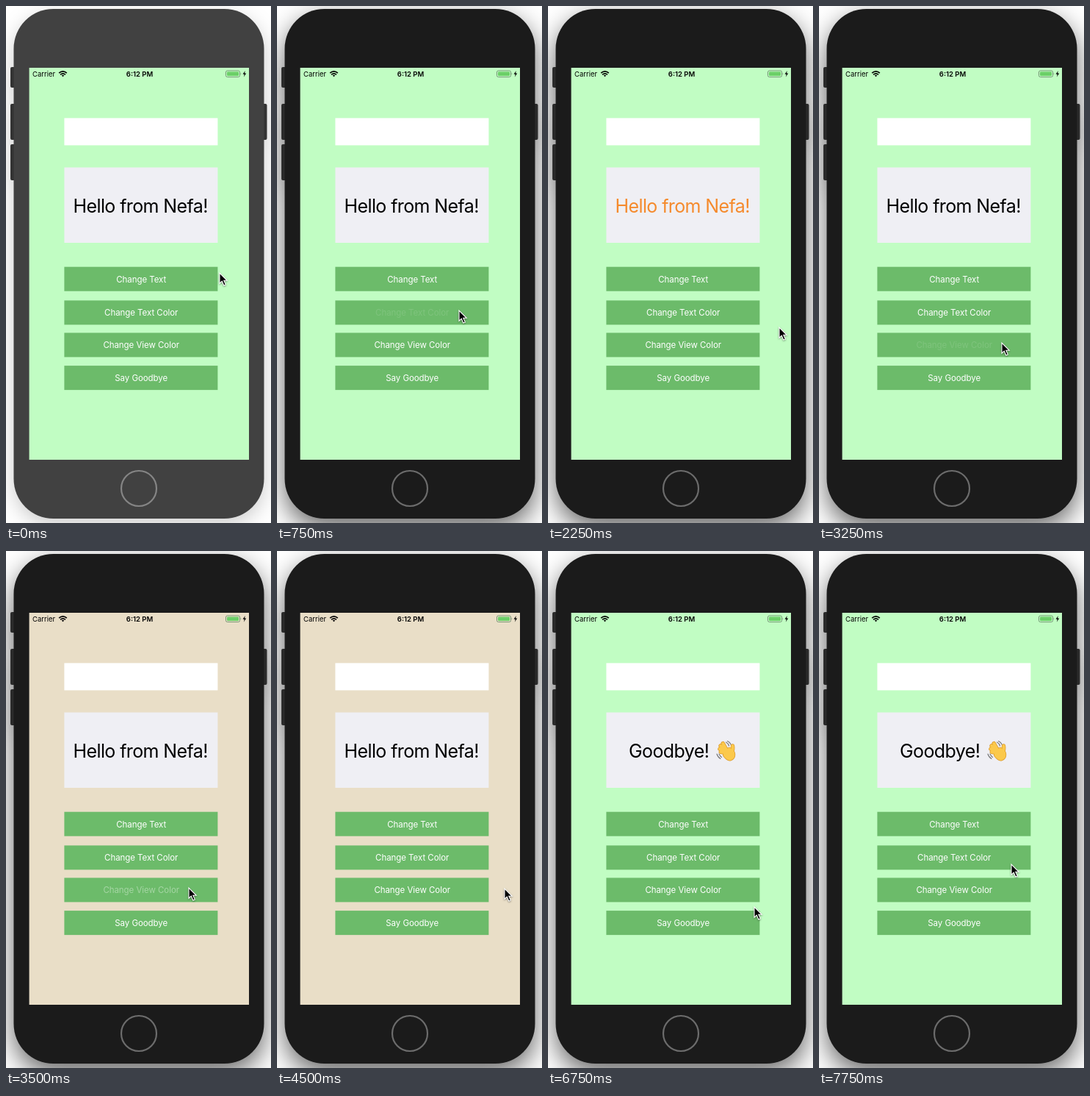
Recreate the animation shown at these times as an HTML page. Size 361 by 703 pixels, loop 8 s.

```html
<!DOCTYPE html>
<html lang="en">
<head>
<meta charset="utf-8">
<title>Label demo</title>
<style>
  html, body { margin: 0; height: 100%; overflow: hidden; background: #fff; }
  svg { display: block; width: 100vw; height: 100vh; font-family: Inter, "Liberation Sans", sans-serif; }
  #phone { fill: #414141; filter: drop-shadow(0 8px 13px #0003); }
  #phone.active { fill: #1b1b1b; filter: drop-shadow(0 13px 17px #0009); }
  #keys { fill: #333; }
  .active #keys { fill: #2a2a2a; }
  #home { fill: none; stroke: #858585; stroke-width: 2.2; }
  .active + #home { stroke: #6c6c6c; }
  #message { font-size: 25px; letter-spacing: -.6px; }
  #buttons rect { fill: #6cbb6a; }
  #buttons text { font-size: 11.5px; letter-spacing: -.06px; fill: #fff; text-anchor: middle; }
  #hand { fill: none; stroke-linecap: round; stroke-linejoin: round; }
</style>
</head>
<body>
<svg viewBox="0 0 361 703">
  <defs>
    <path id="fingers"/>
    <path id="palm" d="M247 271L251 275Q252 280 248 281.500Q245 281 242 277Z"/>
  </defs>
  <g id="phone">
    <g id="keys">
      <rect x="6" y="83" width="8" height="28" rx="2"/>
      <rect x="6" y="133" width="8" height="49" rx="2"/>
      <rect x="6" y="188" width="8" height="49" rx="2"/>
      <rect x="348" y="133" width="7.500" height="49" rx="2"/>
    </g>
    <rect x="10.500" y="4" width="341" height="693" rx="54"/>
  </g>
  <circle id="home" cx="181" cy="656" r="24"/>
  <rect id="view" x="31.600" y="84" width="299.400" height="533"/>

  <g font-size="9.500">
    <text x="36" y="95.700">Carrier</text>
    <text x="182" y="95.700" text-anchor="middle" font-weight="600">6:12 PM</text>
  </g>
  <g fill="none" stroke="#000" stroke-width="1.700">
    <path d="M72.200 91.200Q77.500 86.500 82.800 91.200M74.100 93.300Q77.500 90.300 80.900 93.300"/>
    <path d="M77.500 96.300L75.800 94.400Q77.500 93 79.200 94.400Z" fill="#000" stroke="none"/>
  </g>
  <rect x="299.500" y="88" width="19" height="8.500" rx="2" fill="none" stroke="#6d8f6d" stroke-width=".9"/>
  <rect x="301" y="89.500" width="16" height="5.500" rx="1" fill="#6ccf68"/>
  <path d="M319.600 90.800q1.600 1.400 0 2.900z" fill="#6d8f6d"/>
  <path d="M325.800 88L322.600 92.800H324.800L323.900 96.500L327.200 91.500H325Z"/>

  <rect x="79.400" y="152.400" width="209" height="37" fill="#fff"/>
  <rect x="79.400" y="219.500" width="209" height="102.500" fill="#efeff4"/>
  <text id="message" y="281"></text>
  <g id="hand">
    <g stroke="#dc9a2c">
      <use href="#fingers" stroke-width="5.400"/>
      <use href="#palm" stroke-width="8"/>
    </g>
    <g stroke="#fbc94b">
      <use href="#fingers" stroke-width="4"/>
      <use href="#palm" fill="#fbc94b" stroke-width="6.600"/>
    </g>
    <path d="M230 276Q231 280 235 282.500M233 276Q234 278.500 236.500 280.500M242.500 260Q245.500 261.500 246.500 265M244.500 258.500Q248 260 249 263" stroke="#777" stroke-width="1.100"/>
  </g>
  <g id="buttons"></g>
  <path id="cursor" d="M0 0V14.200L3.300 11.200L5.800 17L8.300 15.900L5.800 10.300H10.200Z" stroke="#fff" stroke-width="1.100" style="filter:drop-shadow(0 1px 1px #0006)"/>
</svg>
<script>
const LOOP = 8000, STEP = 250, EFFECT = 1500;
const $ = id => document.getElementById(id);
const within = (t, from, to) => t >= from && t < to;
const ease = k => k * k * (3 - 2 * k);

// Each move glides to a resting place and stays until the next one.
const start = { x: 291, y: 363 };
const moves = [
  { from: 0, to: 750, x: 248, y: 414 },
  { from: 1250, to: 2000, x: 315, y: 437 },
  { from: 2250, to: 3000, x: 249, y: 458 },
  { from: 3500, to: 4500, x: 310, y: 459 },
  { from: 5250, to: 6000, x: 257, y: 503 },
  { from: 6250, to: 6750, x: 281, y: 484 },
  { from: 6750, to: 7750, x: 262, y: 426 }
];

function pointerAt(t) {
  let { x, y } = start;
  for (const move of moves) {
    const k = ease(Math.min(1, Math.max(0, (t - move.from) / (move.to - move.from))));
    x += (move.x - x) * k;
    y += (move.y - y) * k;
  }
  return [x, y];
}

const [, recolorText, recolorView, farewell] = [
  { text: "Change Text", y: 354.7 },
  { text: "Change Text Color", y: 400.4, down: 750, up: 1000 },
  { text: "Change View Color", y: 444.4, down: 3000, up: 3500 },
  { text: "Say Goodbye", y: 489.1, down: 6000, up: 6250 }
].map(addButton);

function addButton(button) {
  $("buttons").insertAdjacentHTML("beforeend",
    `<rect x="79.4" y="${button.y}" width="209" height="33"/><text x="184.2" y="${button.y + 21}">${button.text}</text>`);
  return { ...button, caption: $("buttons").lastElementChild };
}

function showPress({ caption, down, up }, t) {
  caption.setAttribute("opacity", within(t, down, up) ? .12 : within(t, up, up + STEP) ? .38 : 1);
}

// Four fingers fanned around the palm, then the thumb.
function fingerPath() {
  let d = "M250 274Q252.500 270 251.500 265";
  for (let i = 0; i < 4; i++) {
    const angle = (60 - 17 * i) * Math.PI / 180;
    const at = r => `${246 - r * Math.cos(angle)} ${275 - r * Math.sin(angle)}`;
    d += `M${at(3)}L${at(15.4 - i * i / 2)}`;
  }
  return d;
}
$("fingers").setAttribute("d", fingerPath());

function draw(now) {
  const t = Math.floor(now % LOOP / STEP) * STEP;
  const orange = within(t, recolorText.up, recolorText.up + EFFECT);
  const tan = within(t, recolorView.up, recolorView.up + EFFECT);
  const goodbye = t >= farewell.up;

  $("phone").setAttribute("class", t >= recolorText.down ? "active" : "");
  $("view").setAttribute("fill", tan ? "#e9dec7" : "#c1fdc3");
  $("message").textContent = goodbye ? "Goodbye!" : "Hello from Nefa!";
  $("message").setAttribute("x", goodbye ? 110 : 91.5);
  $("message").setAttribute("fill", orange ? "#f58a2c" : "#000");
  $("hand").setAttribute("visibility", goodbye ? "visible" : "hidden");
  for (const button of [recolorText, recolorView, farewell]) showPress(button, t);
  $("cursor").setAttribute("transform", `translate(${pointerAt(t)})`);
  requestAnimationFrame(draw);
}
requestAnimationFrame(draw);
</script>
</body>
</html>
```
